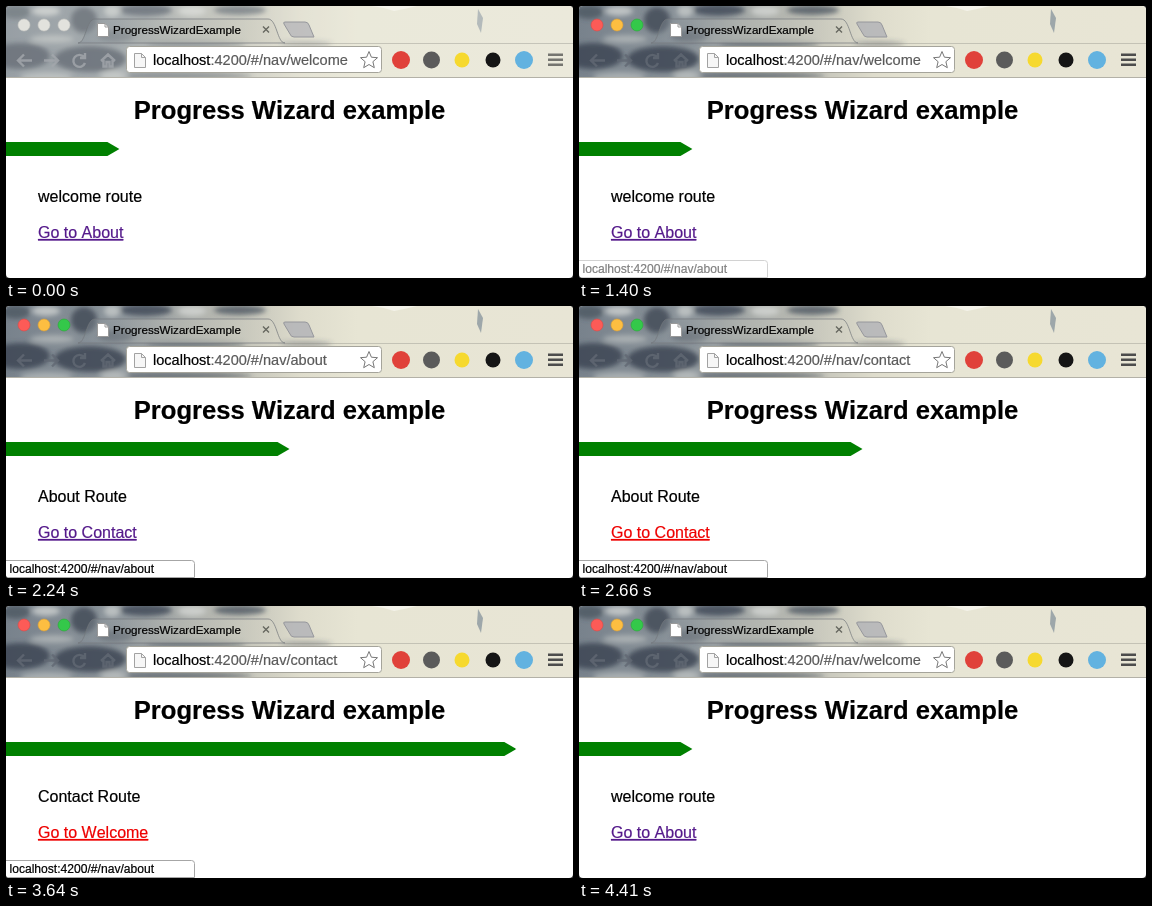
Recreate the animation shown at these times as an HTML page. Size 567 px wide and 272 px high, loop 4.83 s.

```html
<!DOCTYPE html>
<html lang="en">
<head>
<meta charset="utf-8">
<title>Progress Wizard example</title>
<style>
  html, body { margin: 0; width: 100%; height: 100%; overflow: hidden; background: #2b2b2b; }
  svg { display: block; width: 567px; height: 272px; font-family: "Liberation Sans", Arial, sans-serif; font-kerning: none; }
  text { white-space: pre; fill: #000; stroke: #000; stroke-width: .2; }
  .path { fill: #5a5a5a; stroke: #5a5a5a; }
  .nav { fill: none; stroke: #626974; stroke-width: 2.4; opacity: .8; }
  .menu { fill: #4c4c4c; }
  .veil { fill: #f4f3ec; opacity: 0; }
  .idle .veil { opacity: .25; }
  .idle .light { fill: #e2e2dd; stroke: #c9c9c4; }
  .idle .nav { stroke: #a4a8ad; }
  .idle .menu { fill: #757570; }
  .page { font-size: 16px; }
  .link { fill: #551a8b; stroke: #551a8b; text-decoration: underline; }
  .link.pressed { fill: #e00; stroke: #e00; }
</style>
</head>
<body>
<svg id="stage" class="idle" viewBox="0 0 567 272">
  <defs>
    <clipPath id="window"><rect width="567" height="272" rx="4"/></clipPath>
    <clipPath id="chrome"><rect width="567" height="72"/></clipPath>
    <linearGradient id="sky">
      <stop offset="0" stop-color="#78828c"/>
      <stop offset=".2" stop-color="#8d959b"/>
      <stop offset=".38" stop-color="#b9bab2"/>
      <stop offset=".52" stop-color="#dedccc"/>
      <stop offset=".62" stop-color="#e7e5d4"/>
      <stop offset="1" stop-color="#e8e5d5"/>
    </linearGradient>
    <linearGradient id="tabFill">
      <stop offset="0" stop-color="#7f8a94" stop-opacity=".35"/>
      <stop offset=".4" stop-color="#b5b8b2" stop-opacity=".5"/>
      <stop offset="1" stop-color="#d8d6c7" stop-opacity=".6"/>
    </linearGradient>
    <filter id="soft" x="-30%" y="-60%" width="160%" height="220%"><feGaussianBlur stdDeviation="2.5"/></filter>
  </defs>

  <g clip-path="url(#window)">
    <rect width="567" height="272" fill="#fff"/>

    <g clip-path="url(#chrome)">
      <rect width="567" height="72" fill="url(#sky)"/>
      <g filter="url(#soft)">
        <g fill="#3d4754">
          <ellipse cx="14" cy="50" rx="30" ry="13" opacity=".85"/>
          <ellipse cx="84" cy="53" rx="36" ry="13" opacity=".85"/>
          <ellipse cx="78" cy="14" rx="13" ry="13" opacity=".8"/>
          <ellipse cx="10" cy="6" rx="14" ry="7" opacity=".6"/>
          <ellipse cx="140" cy="4" rx="26" ry="6" opacity=".8"/>
          <ellipse cx="234" cy="4" rx="26" ry="5" opacity=".7"/>
          <ellipse cx="110" cy="30" rx="18" ry="6" opacity=".6"/>
          <ellipse cx="190" cy="38" rx="50" ry="4" opacity=".45"/>
          <ellipse cx="180" cy="70" rx="66" ry="4" opacity=".5"/>
          <ellipse cx="300" cy="38" rx="26" ry="3" opacity=".35"/>
        </g>
        <g fill="#d9dcd8">
          <ellipse cx="40" cy="5" rx="14" ry="5" opacity=".7"/>
          <ellipse cx="46" cy="33" rx="22" ry="4" opacity=".45"/>
          <ellipse cx="106" cy="5" rx="8" ry="6" opacity=".6"/>
          <ellipse cx="186" cy="5" rx="14" ry="5" opacity=".7"/>
          <ellipse cx="40" cy="71" rx="26" ry="5" opacity=".45"/>
          <ellipse cx="108" cy="70" rx="14" ry="5" opacity=".5"/>
        </g>
      </g>
      <path d="M366 0H411L398 3L388 5L378 2Z" fill="#f4f3ea"/>
      <path d="M472 3L477 12L475 27L471 18Z" fill="#8b979f" opacity=".8"/>
      <rect class="veil" width="567" height="72"/>
      <path d="M72 37C80 37 80 13 89 13H262C271 13 271 37 279 37Z" fill="url(#tabFill)" stroke="#73777b" stroke-opacity=".7"/>
      <path d="M279 37.5H567" stroke="#8d8d84" stroke-opacity=".4"/>
      <path id="newTab" d="M279 16H299Q302 16 303 19L308 31H288Q285 31 284 28L278 18Q277 16 279 16Z" fill="#b0b1b6" stroke="#96979c"/>
      <path d="M0 71.5H567" stroke="#b3b1a7"/>
    </g>

    <g stroke-width=".6">
      <circle class="light" cx="18" cy="19" r="6" fill="#fc5b57" stroke="#df4744"/>
      <circle class="light" cx="38" cy="19" r="6" fill="#fdbe41" stroke="#de9f34"/>
      <circle class="light" cx="58" cy="19" r="6" fill="#34c84a" stroke="#27aa35"/>
    </g>

    <path d="M91.500 17.500H99L102.500 21V30.500H91.500Z" fill="#fff" stroke="#999"/>
    <path d="M99 17.500V21H102.500" fill="none" stroke="#999"/>
    <text x="107" y="28" font-size="11.63">ProgressWizardExample</text>
    <path d="M257 20.500L263 26.500M263 20.500L257 26.500" stroke="#66675f" stroke-width="1.400"/>

    <g class="nav">
      <path d="M26 54.500H12M18 48.500L12 54.500L18 60.500"/>
      <path d="M38 54.500H52M46 48.500L52 54.500L46 60.500"/>
      <path d="M78 51A6 6 0 1 0 79 57M79 47V52H74"/>
      <path d="M95 55L102 48.500L109 55M97.500 54V60.500H100.500V56H103.500V60.500H106.500V54"/>
    </g>

    <rect x="120.500" y="40.500" width="255" height="26" rx="3" fill="#fff" stroke="#a5a49b"/>
    <path d="M128.500 47.500H135.500L139.500 51.500V61.500H128.500Z" fill="#f6f6f6" stroke="#a2a2a2"/>
    <path d="M135.500 47.500V51.500H139.500" fill="none" stroke="#a2a2a2"/>
    <text x="147" y="59" font-size="14.56">localhost<tspan class="path">:4200/#/nav/<tspan id="route"></tspan></tspan></text>
    <path d="M363 45.500L365.400 51.200L371.500 51.700L366.900 55.700L368.300 61.700L363 58.500L357.700 61.700L359.100 55.700L354.500 51.700L360.600 51.200Z" fill="#fff" stroke="#777"/>

    <circle cx="395" cy="54" r="9" fill="#e0413a"/>
    <circle cx="425.500" cy="54" r="8.500" fill="#5b5b5b"/>
    <circle cx="456" cy="54" r="7.500" fill="#f6d92f"/>
    <circle cx="487" cy="54" r="7.500" fill="#151515"/>
    <circle cx="518" cy="54" r="9" fill="#62b2e0"/>
    <path class="menu" d="M542 47.500h15v2.600h-15zM542 52.500h15v2.600h-15zM542 57.500h15v2.600h-15z"/>

    <text x="283.500" y="113" font-size="25.6" font-weight="bold" text-anchor="middle">Progress Wizard example</text>
    <path id="bar" d="M-600 136H-12L0 143L-12 150H-600Z" fill="#008000"/>
    <text id="label" class="page" x="32" y="196"></text>
    <text id="link" class="page link" x="32" y="232"></text>

    <g id="status">
      <path d="M-1 254.500H185.500Q188.500 254.500 188.500 257.500V271.500H-1Z" fill="#fff" stroke="#a6a6a6"/>
      <text x="3.500" y="267" font-size="12.1">localhost:4200/#/nav/about</text>
    </g>
  </g>
</svg>

<script>
  const LOOP = 4830, TICK = 70, WIDTH = 567, SLIDE = 500;
  const el = id => document.getElementById(id);
  const [stage, newTab, route, bar, label, link, status] =
    ["stage", "newTab", "route", "bar", "label", "link", "status"].map(el);

  const pages = [
    { route: "welcome", label: "welcome route", link: "Go to About", share: .2 },
    { route: "about", label: "About Route", link: "Go to Contact", share: .5 },
    { route: "contact", label: "Contact Route", link: "Go to Welcome", share: .9 }
  ];

  // Times of each click: link pressed, address changed, bar sliding, page swapped
  const clicks = [
    { press: 1540, address: 1680, slide: 1703, swap: 1750 },
    { press: 2590, address: 2660, slide: 2699, swap: 2730 },
    { press: 3640, address: 3710, slide: 3733, swap: 3780 }
  ];

  const clamp = v => Math.min(1, Math.max(0, v));
  const bezier = (a, b, u) => 3 * a * u * (1 - u) ** 2 + 3 * b * u * u * (1 - u) + u ** 3;

  // Same curve as the CSS keyword "ease"
  function ease(x) {
    if (x <= 0 || x >= 1) return clamp(x);
    let lo = 0, hi = 1;
    for (let i = 0; i < 24; i++) {
      const mid = (lo + hi) / 2;
      if (bezier(.25, .25, mid) < x) lo = mid; else hi = mid;
    }
    return bezier(.1, 1, lo);
  }

  const pageAt = (t, stepName) => pages[clicks.filter(c => t >= c[stepName]).length % pages.length];

  function setText(node, text) {
    if (node.textContent !== text) node.textContent = text;
  }

  function draw(t) {
    const page = pageAt(t, "swap");
    setText(route, pageAt(t, "address").route);
    setText(label, page.label);
    setText(link, page.link);
    link.classList.toggle("pressed", clicks.some(c => t >= c.press && t < c.swap));
    stage.classList.toggle("idle", t < 770);
    newTab.style.fillOpacity = t < 420 ? .7 : t < 490 ? .75 : .8;

    let share = pages[0].share;
    clicks.forEach((c, i) => {
      const next = pages[(i + 1) % pages.length].share;
      share += (next - share) * ease((t - c.slide) / SLIDE);
    });
    bar.setAttribute("transform", `translate(${share * WIDTH} 0)`);

    const shown = clamp((t - 1330) / 140) - clamp((t - 4200) / 200);
    status.style.opacity = clamp(shown);
  }

  const start = performance.now();
  function frame() {
    const t = (performance.now() - start) % LOOP;
    draw(Math.floor(t / TICK) * TICK);
    requestAnimationFrame(frame);
  }
  frame();
</script>
</body>
</html>
```
